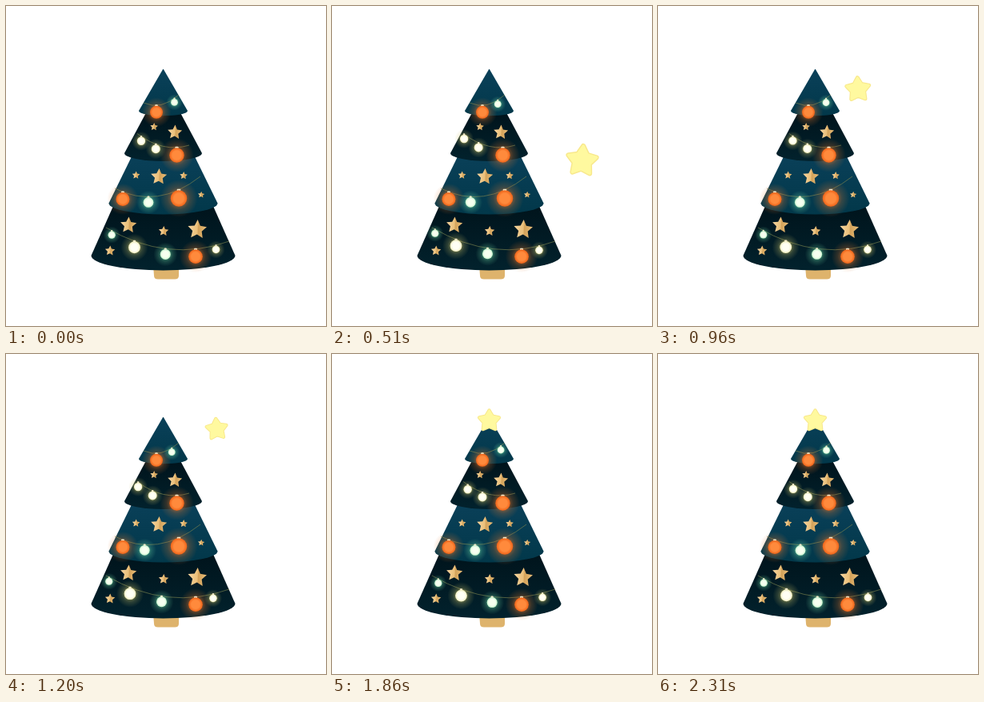
Animation of 400 by 400 pixels, one loop 2.52 s. Source, as an HTML page:

```html
<!DOCTYPE html>
<html lang="en">
<head>
<meta charset="utf-8">
<title>Christmas tree</title>
<style>
html, body { margin: 0; width: 100%; height: 100%; overflow: hidden; background: #fff; }
svg { display: block; width: 100vw; height: 100vh; }
</style>
</head>
<body>
<svg id="stage" viewBox="0 0 400 400">
  <defs id="defs">
    <linearGradient id="teal" x1="0" y1="0" x2="0" y2="1">
      <stop offset="0" stop-color="#0a4059"/><stop offset="1" stop-color="#02384a"/>
    </linearGradient>
    <linearGradient id="night" x1="0" y1="0" x2="0" y2="1">
      <stop offset="0" stop-color="#00131b"/><stop offset="1" stop-color="#02222d"/>
    </linearGradient>
    <linearGradient id="gold" x1="0" x2="1">
      <stop offset=".1" stop-color="#f4d199"/><stop offset=".5" stop-color="#eabf79"/>
      <stop offset=".56" stop-color="#d3a25a"/><stop offset="1" stop-color="#e8bd78"/>
    </linearGradient>
  </defs>
  <g id="tree">
    <path d="M184 324H216V337Q216 341.500 211 341.500H190Q185 341.500 185 337Z" fill="#deb36c"/>
  </g>
</svg>
<script>
const LOOP = 2520, STEP = 30, CENTER = 196.5, TIP = 79;
const [stage, defs, tree] = ['stage', 'defs', 'tree'].map(id => document.getElementById(id));

function add(parent, tag, attrs = {}) {
  const node = document.createElementNS('http://www.w3.org/2000/svg', tag);
  for (const k in attrs) node.setAttribute(k, attrs[k]);
  return parent.appendChild(node);
}

function starPath(r, inner) {
  let d = '';
  for (let i = 0; i < 10; i++) {
    const a = i * Math.PI / 5, q = i % 2 ? r * inner : r;
    d += (i ? 'L' : 'M') + (q * Math.sin(a)).toFixed(2) + ' ' + (-q * Math.cos(a)).toFixed(2);
  }
  return d + 'Z';
}

function radial(id, stops) {
  const g = add(defs, 'radialGradient', { id });
  for (const [offset, color, opacity = 1] of stops)
    add(g, 'stop', { offset, 'stop-color': color, 'stop-opacity': opacity });
}

// Each kind of ball: middle, rim and halo colour
const kinds = {
  orange: ['#ff8a3c', '#ee6318', '#e8762a'],
  mint: ['#f6fff0', '#c8f5cf', '#6fd8a4'],
  cream: ['#fffff4', '#f2efc0', '#cfc468']
};
for (const [kind, [middle, rim, glow]] of Object.entries(kinds)) {
  radial(kind, [[0, middle], [0.6, middle], [1, rim]]);
  radial(kind + 'Glow', [[0.3, glow, 0.6], [0.6, glow, 0.22], [1, glow, 0]]);
}

// Tiers: height of the corners and half width; each starts behind the one above
const tiers = [[131, 30.5], [184, 48.5], [246.5, 68], [312, 90]];
for (let i = 3; i >= 0; i--) {
  const [y, half] = tiers[i];
  const top = i ? tiers[i - 1][0] : TIP;
  const topHalf = half - (0.58 - 0.045 * i) * (y - top);
  add(tree, 'path', {
    d: `M${CENTER - topHalf} ${top}L${CENTER - half} ${y}A${half} ${half * 0.205} 0 0 0 ${CENTER + half} ${y}L${CENTER + topHalf} ${top}Z`,
    fill: `url(#${i % 2 ? 'night' : 'teal'})`
  });
}

// x, y, radius
[[211, 158, 9.4], [185, 151, 5], [191, 213.5, 10.5], [162.5, 211.5, 5], [222, 212, 5],
 [244, 236, 4.3], [153, 274, 10.6], [239, 279.5, 12.4], [197, 281.5, 6.5], [130, 306, 6.5]]
.forEach(([x, y, r]) => add(tree, 'path', {
  d: starPath(r, 0.49), fill: 'url(#gold)', transform: `translate(${x} ${y}) rotate(3)`
}));

// Garlands: a curve between two ends, with balls given as x, radius, kind
const garlands = [
  { from: 172, to: 216, ys: [121, 131, 111], balls: [[188, 8, 'orange'], [210.5, 4.4, 'mint']] },
  { from: 164, to: 229, ys: [159.5, 184, 174], balls: [[169, 5.2, 'cream'], [187.3, 5.5, 'cream'], [213.5, 9.2, 'orange']] },
  { from: 136, to: 243, ys: [228, 255, 213], balls: [[146, 8.5, 'orange'], [178, 6.4, 'mint'], [216, 10.2, 'orange']] },
  { from: 125, to: 279, ys: [277, 322, 294], balls: [[132.2, 4.6, 'mint'], [160.5, 7.4, 'cream'], [199.3, 6.5, 'mint'], [237, 8.8, 'orange'], [262.5, 4.8, 'cream']] }
];

function wireY({ from, to, ys: [a, b, c] }, x) {
  const u = (x - from) / (to - from), v = 1 - u;
  return a * v * v + 2 * b * u * v + c * u * u;
}

function makeBall(r, kind) {
  const g = add(tree, 'g');
  add(g, 'circle', { r: r * 2.3, fill: `url(#${kind}Glow)` });
  add(g, 'rect', { x: -r * 0.22, y: -r - 1.5, width: r * 0.44, height: 2.6, rx: 0.7, fill: '#f0e6c8' });
  add(g, 'circle', { r, fill: `url(#${kind})` });
  return g;
}

for (const { from, to, ys: [a, b, c] } of garlands)
  add(tree, 'path', {
    d: `M${from} ${a}Q${(from + to) / 2} ${b} ${to} ${c}`,
    fill: 'none', stroke: '#7f8450', 'stroke-width': 0.8, opacity: 0.8
  });

const balls = garlands.flatMap(wire => wire.balls.map(([x, r, kind]) =>
  ({ wire, x, r, slide: kind === 'orange' ? 0 : r / 7.4, node: makeBall(r, kind) })));

const star = add(stage, 'g');
[[4.4, '#f8e88c'], [2.4, '#fff99f']].forEach(([width, color]) => add(star, 'path', {
  d: starPath(13, 0.55), fill: color, stroke: color, 'stroke-width': width, 'stroke-linejoin': 'round'
}));

// Half turns around the tree: time, offset from the trunk, height
const turns = [[10, 0, 300], [270, -116, 260], [530, 116.5, 188], [790, -78, 118], [1050, 79.5, 97], [1490, 0, 88], [1690, 0, 83.5]];
// Sideways swing of the small lights: time, distance
const swings = [[0, 0], [250, 3], [510, -5.5], [770, 3], [1180, -5.5], [1890, 1], [2310, 0]];

const linear = p => p;
const cosine = p => (1 - Math.cos(Math.PI * p)) / 2;
const cubic = p => p < 0.5 ? 4 * p ** 3 : 1 - 4 * (1 - p) ** 3;

function at(points, t, column, ease) {
  let i = 0;
  while (i < points.length - 2 && t >= points[i + 1][0]) i++;
  const a = points[i], b = points[i + 1];
  const p = Math.min(1, Math.max(0, (t - a[0]) / (b[0] - a[0])));
  return a[column] + (b[column] - a[column]) * ease(p);
}

function draw(t) {
  const x = CENTER + at(turns, t, 1, cubic);
  const y = at(turns, t, 2, linear);
  const size = 1 + 0.42 * Math.sqrt(Math.max(0, (y - 95) / 99));
  const tilt = t < 1590 ? -5 * Math.sin(Math.PI * (t - 850) / 740) : 0;
  star.setAttribute('transform', `translate(${x} ${y}) rotate(${tilt}) scale(${size})`);

  const behind = t < 270 || (t >= 530 && t < 790);
  stage.insertBefore(star, behind ? tree : null);

  const swing = at(swings, t, 1, cosine);
  for (const b of balls) {
    const bx = b.x + swing * b.slide;
    b.node.setAttribute('transform', `translate(${bx} ${wireY(b.wire, bx) + b.r + 0.5})`);
  }
}

const start = performance.now();
function frame() {
  const t = (performance.now() - start) % LOOP;
  draw(Math.floor(t / STEP) * STEP);
  requestAnimationFrame(frame);
}
draw(0);
requestAnimationFrame(frame);
</script>
</body>
</html>
```
